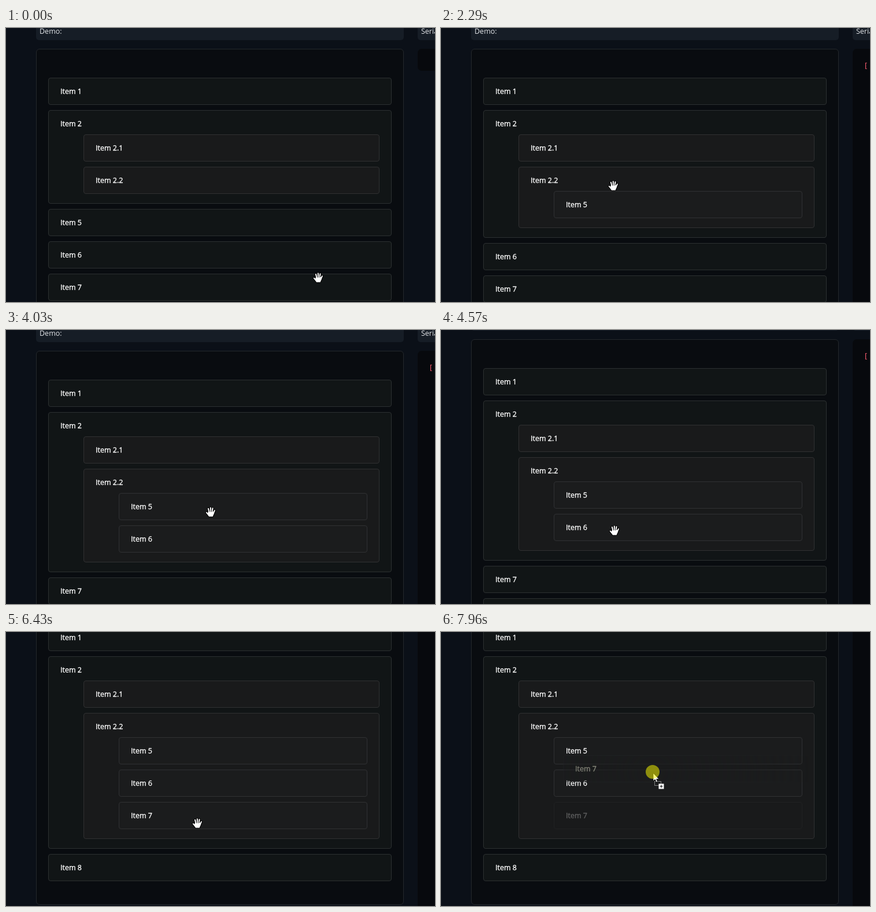
These frames come from a looping animation (742 by 474 pixels, 8 s). An HTML page:

```html
<!DOCTYPE html>
<html lang="en">
<head>
<meta charset="utf-8">
<title>Nested drag and drop list</title>
<style>
  html, body { margin: 0; width: 100%; height: 100%; overflow: hidden; background: #0b1018; }
  body { position: relative; font: 500 12.5px "Open Sans", "Noto Sans", sans-serif; color: #fff; }
  #page, #page div, #ghost, #ghost span, #page span, svg { position: absolute; box-sizing: border-box; }
  #page { left: 0; top: 0; width: 742px; height: 1000px; }
  #page .bar { top: -13px; height: 34px; border-radius: 5px; background: #161d26; color: #e4e7ea; white-space: nowrap; }
  .bar span { left: 6px; top: 10px; line-height: 18px; }
  #panel { left: 52px; top: 36px; width: 636px; border: 1px solid #24282c; border-radius: 6px; background: #090c10; }
  #json { left: 712px; top: 36px; width: 400px; border-radius: 7px; background: #07090d; }
  #json span { left: 19px; top: 20px; font: 13px/20px "DejaVu Sans Mono", monospace; color: #f2596b; }
  .item { border: 1px solid; border-radius: 4px; }
  .item span { left: 20px; top: 0; line-height: 46px; white-space: nowrap; -webkit-text-stroke: .35px; }
  .l0 { background: #111516; border-color: #2c3031; }
  .l1 { background: #191a1b; border-color: #303132; }
  .l2 { background: #1b1c1d; border-color: #303133; }
  #ghost { color: #f8f8de; border-color: #222627; }
  svg { left: 0; top: 0; width: 742px; height: 474px; }
</style>
</head>
<body>
<div id="page">
  <div class="bar" style="left:52px;width:636px"><span>Demo:</span></div>
  <div class="bar" style="left:712px;width:400px"><span>Serialised:</span></div>
  <div id="panel"></div>
  <div id="json"><span>[</span></div>
</div>
<div id="ghost"><span></span></div>
<svg viewBox="0 0 742 474">
  <defs>
    <path id="fingers" d="M-2 1L-3.8-5.6M0 1L-.2-7M2 1L3.2-6.2M4 3L6.3-2.6M-3 5L-6.6 .8" fill="none" stroke-linecap="round"/>
    <path id="palm" d="M-3.6-1L4.8-1L5 3L3.4 7.2H-2.8L-5.4 3Z" stroke-linejoin="round"/>
  </defs>
  <g id="pointer">
    <g id="hand" transform="scale(1.08)">
      <use href="#fingers" stroke="#000" stroke-width="3.8"/>
      <use href="#palm" stroke="#000" stroke-width="2"/>
      <use href="#fingers" stroke="#fff" stroke-width="1.9"/>
      <use href="#palm" fill="#fff"/>
      <path d="M-1.2 0V-3M1.3 0V-3" stroke="#000" stroke-width=".6"/>
    </g>
    <g id="copy" transform="translate(1 2)">
      <rect x="2.5" y="14.5" width="11" height="7" fill="none" stroke="#000"/>
      <rect x="2.5" y="14.5" width="11" height="7" fill="none" stroke="#fff" stroke-dasharray="1 1"/>
      <path d="M0 0V14L3.2 11L5.5 16L7.8 15L5.6 10.4H10Z" fill="#fff" stroke="#000" stroke-width=".8"/>
      <rect x="9.5" y="18.5" width="9" height="9" fill="#fff"/>
      <path d="M11.5 23H16.5M14 20.5V25.5" stroke="#000"/>
    </g>
    <g id="deny" fill="none">
      <path d="M-6-6L6 6" stroke="#fff" stroke-width="3.8"/>
      <circle r="8.2" stroke="#fff" stroke-width="3.8"/>
      <path d="M-5.8-5.8L5.8 5.8" stroke="#000" stroke-width="2.2"/>
      <circle r="8.2" stroke="#000" stroke-width="2.2"/>
    </g>
    <circle id="press" r="12" fill="#ff0" fill-opacity=".51"/>
  </g>
</svg>
<script>
const LOOP = 8000, STEP = 200 / 3, SHIFT = 100 / 3;
const GAP = 9, ROW = 47, INDENT = 61;
const $ = id => document.getElementById(id);
const show = (id, on) => { $(id).style.display = on ? '' : 'none'; };
const progress = (t, from, to) => Math.min(1, Math.max(0, (t - from) / (to - from)));
const smooth = f => f * f * (3 - 2 * f);

// pointer moves: begin, end, x, y; it rests in between
const moves = [
  [69, 70, 463, 398], [300, 1033, 188, 345],
  [1300, 1367, 199, 334], [1367, 1767, 307, 262],
  [2167, 3033, 196, 408], [3110, 3833, 354, 315],
  [4167, 4567, 300, 347], [4567, 5033, 240, 349],
  [5100, 5900, 328, 293],
  [6100, 6433, 331, 331], [6433, 6567, 343, 370],
  [6840, 7233, 350, 323], [7233, 7700, 350, 254], [7700, 7967, 366, 242]
];
const drags = [
  { name: '5', from: 1300, to: 2033 },
  { name: '6', from: 3100, to: 4033 },
  { name: '7', from: 5100, to: 5967 },
  { name: '7', from: 7233, to: LOOP + 1 }
];

function pointer(t) {
  let x = 540, y = 432;
  for (const [from, to, toX, toY] of moves) {
    const f = progress(t, from, to);
    x += (toX - x) * f;
    y += (toY - y) * f;
  }
  return [Math.round(x), Math.round(y)];
}

const items = {};
for (const name of ['1', '2', '2.1', '2.2', '5', '6', '7', '8']) {
  const el = document.createElement('div');
  el.innerHTML = `<span>Item ${name}</span>`;
  $('page').append(el);
  items[name] = { el };
}

function setBox(el, box) {
  el.className = 'item l' + box.level;
  for (const k of ['left', 'top', 'width', 'height']) el.style[k] = box[k] + 'px';
}

// stacks [name, children] entries and returns the bottom edge
function place(list, level, top) {
  let bottom = top - GAP;
  for (const [name, kids] of list) {
    const y = bottom + GAP;
    bottom = kids && kids.length ? place(kids, level + 1, y + 42) + 17 : y + ROW;
    const item = items[name];
    item.box = { level, left: 73 + INDENT * level, top: y, width: 594 - 82 * level, height: bottom - y };
    setBox(item.el, item.box);
  }
  return bottom;
}

let shown = -1;
function arrange(moved) {
  if (moved === shown) return;
  shown = moved;
  const loose = [['5'], ['6'], ['7']];
  const inner = loose.splice(0, moved);
  const bottom = place([['1'], ['2', [['2.1'], ['2.2', inner]]], ...loose, ['8']], 0, 86);
  $('panel').style.height = bottom + 5 + 'px';
  $('json').style.height = (moved ? 900 : 38) + 'px';
  $('json').firstChild.style.display = moved ? '' : 'none';
}

function drawGhost(box, [x, y], [pressX, pressY]) {
  const ghost = $('ghost');
  setBox(ghost, { ...box, left: box.left + x - pressX, top: box.top + y - pressY });
  const center = `${pressX - box.left}px ${pressY - box.top}px`;
  const mask = `radial-gradient(circle 300px at ${center}, rgba(0,0,0,.75), transparent)`;
  ghost.style.webkitMaskImage = ghost.style.maskImage = mask;
}

function render(time) {
  const t = time < 70 ? 0 : Math.max(70, Math.floor((time - SHIFT + 7) / STEP) * STEP + SHIFT + .1);
  const spot = pointer(t);
  const offset = Math.round(100 * smooth(progress(t, 4490, 4757)));
  const drag = drags.find(d => t >= d.from && t < d.to);

  arrange(drags.filter(d => t >= d.to).length);
  $('page').style.transform = `translateY(${-offset}px)`;
  for (const name in items) items[name].el.style.opacity = drag && drag.name === name ? .3 : 1;

  let blocked = false;
  if (drag) {
    const home = items[drag.name].box;
    const box = { ...home, top: home.top - offset };
    blocked = spot[1] < box.top && spot[1] > box.top - GAP;
    drawGhost(box, spot, pointer(drag.from));
    $('ghost').firstChild.textContent = 'Item ' + drag.name;
  }
  $('pointer').setAttribute('transform', `translate(${spot})`);
  show('ghost', drag);
  show('press', drag);
  show('hand', !drag);
  show('copy', drag && !blocked);
  show('deny', blocked);
}

const start = performance.now();
function tick() {
  render((performance.now() - start) % LOOP);
  requestAnimationFrame(tick);
}
tick();
</script>
</body>
</html>
```
